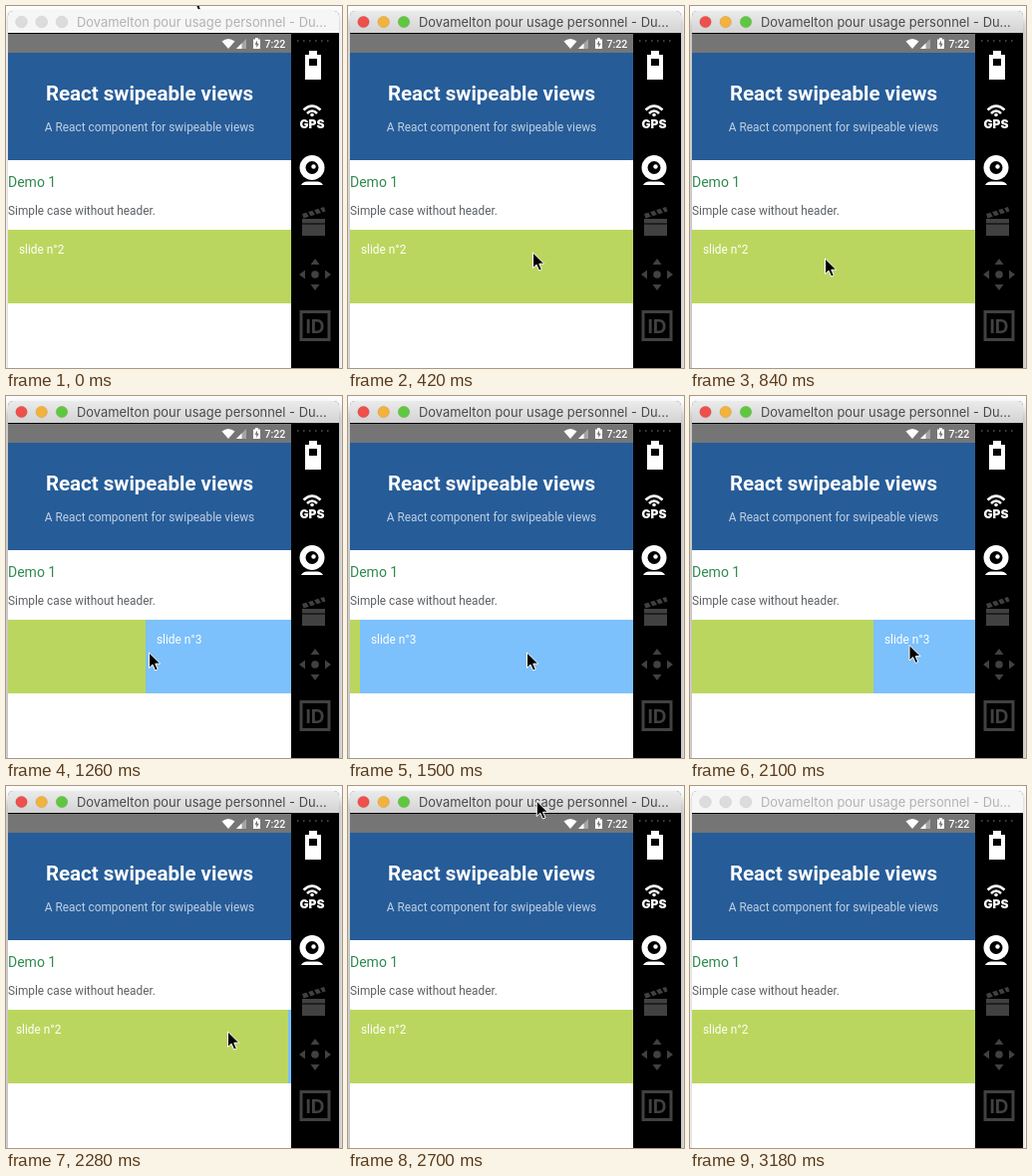
These frames come from a looping animation (337x364 px, 3240 ms). An HTML page:

```html
<!DOCTYPE html>
<html lang="fr">
<head>
<meta charset="utf-8">
<title>Swipeable views</title>
<style>
  html, body { margin: 0; width: 100%; height: 100%; overflow: hidden; background: #fdfdfd; }
  svg { display: block; }
  text { font-family: Roboto, sans-serif; font-size: 11.85px; fill: #fff; }
  #title, .label { font-family: Inter, sans-serif; text-anchor: middle; }
  #title { font-size: 12.9px; text-anchor: start; fill: #b2b2b2; }
  #bar { fill: #f6f6f6; }
  #lights circle { r: 5.8px; fill: #dcdcdc; stroke: #cecece; stroke-width: .6; }
  .active #bar { fill: url(#chrome); }
  .active #title { fill: #484848; }
  .active #lights circle { stroke: #0002; }
  .active #lights :nth-child(1) { fill: #ee504b; }
  .active #lights :nth-child(2) { fill: #f3b23b; }
  .active #lights :nth-child(3) { fill: #5fc73f; }
</style>
</head>
<body>
<svg id="stage" width="337" height="364">
  <defs>
    <linearGradient id="chrome" x2="0" y2="1">
      <stop stop-color="#ebebeb"/><stop offset="1" stop-color="#d3d3d3"/>
    </linearGradient>
  </defs>

  <rect id="frame" x="2" y="5" width="332" height="380" rx="5"/>
  <path id="bar" d="M2 27V10q0-5 5-5H329q5 0 5 5V27Z"/>
  <g id="lights">
    <circle cx="15.5" cy="16"/><circle cx="35.7" cy="16"/><circle cx="56" cy="16"/>
  </g>
  <text id="title" x="71" y="21">Dovamelton pour usage personnel - Du...</text>

  <!-- phone screen -->
  <rect x="2" y="28" width="284" height="336" fill="#fff"/>
  <rect x="2" y="28" width="284" height="19" fill="#757575"/>
  <g fill="#fff">
    <path d="M216.5 35.5Q223 30.500 229.500 35.500L223 43Z"/>
    <path d="M241 33V43H231Z" opacity=".35"/>
    <path d="M236.500 37.500V43H231Z"/>
    <path d="M248 33.500H250V32H253V33.500H255V43H248Z"/>
    <path d="M252 34.500L249.500 38.800H251.200V42L253.700 37.700H252Z" fill="#757575"/>
  </g>
  <text x="259.5" y="42" style="font-size:10.6px;font-weight:500">7:22</text>
  <rect x="2" y="47" width="284" height="108" fill="#265c98"/>
  <text x="144" y="95" text-anchor="middle" style="font-size:20.5px;font-weight:700">React swipeable views</text>
  <text x="144" y="125.5" text-anchor="middle" style="fill:#c0d0e2">A React component for swipeable views</text>
  <text x="2" y="182" style="font-size:14px;fill:#2f8a4e">Demo 1</text>
  <text x="2" y="210" style="fill:#5c6064">Simple case without header.</text>
  <svg x="2" y="225" width="284" height="74">
    <g id="slides">
      <rect width="284" height="74" fill="#bbd65e"/>
      <rect x="284" width="284" height="74" fill="#7cc0fc"/>
      <text x="11" y="24">slide n°2</text>
      <text x="295" y="24">slide n°3</text>
    </g>
  </svg>

  <!-- side tools -->
  <path d="M292 35H326" stroke="#555" stroke-width="1.5" stroke-dasharray="1.5 4.5"/>
  <g fill="#fff">
    <path d="M300 49H304V45H312V49H316V74H300Z"/>
    <rect x="304" y="53" width="8" height="7" fill="#000"/>
    <path d="M298.5 104.5Q307 96.500 315.500 104.500M302 108Q307 103 312 108" fill="none" stroke="#fff" stroke-width="2.5"/>
    <circle cx="307" cy="109.5" r="1.8"/>
    <text class="label" x="307" y="123" style="font-size:12px;font-weight:900">GPS</text>
    <circle cx="307" cy="162.5" r="12.5"/>
    <circle cx="307" cy="162.5" r="6.5" fill="#000"/>
    <circle cx="308.5" cy="161.5" r="2.2"/>
    <path d="M296 180Q298 176 303 176.500H311Q316 176 318 180Z"/>
  </g>
  <g fill="#414141">
    <rect x="297" y="214" width="23" height="17"/>
    <path d="M297 209L319 202L320.500 206.500L298.500 213.500Z"/>
    <path d="M302 207L305 212M308 205L311 210M314 203L317 208" stroke="#000" stroke-width="1.8"/>
    <path d="M297 219H320" stroke="#000"/>
    <circle cx="310" cy="270" r="3.8"/>
    <g id="pad"></g>
    <rect x="296" y="307.5" width="28" height="28" fill="none" stroke="#414141" stroke-width="3"/>
    <text class="label" x="310" y="328.5" style="font-size:19px;font-weight:700;fill:#414141">ID</text>
  </g>

  <path id="cursor" stroke="#fff" d="M0 0V15.500L3.600 12.200L6.100 18L8.800 16.900L6.300 11.200H11.300Z"/>
</svg>
<script>
const LOOP = 3240, STEP = 60, WIDTH = 284;
const el = id => document.getElementById(id);

el('pad').innerHTML = [0, 90, 180, 270].map(a =>
  `<path d="M310 254l4.500 6h-9Z" transform="rotate(${a} 310 270)"/>`).join('');

// Pointer path: [ms, x, y]
const path = [
  [0, 186, -14], [120, 185, 248], [600, 185, 248], [840, 135, 254],
  [1020, 112, 257], [1260, 143, 258], [1500, 179, 258], [1920, 217, 254],
  [2280, 222, 247], [2400, 194, 135], [2520, 194, 135], [2760, 187, -25], [LOOP, 187, -25]
];

function pointer(t) {
  const i = path.findIndex(k => k[0] > t);
  const [t0, x0, y0] = path[i - 1], [t1, x1, y1] = path[i];
  const p = (t - t0) / (t1 - t0);
  return [x0 + (x1 - x0) * p + .5, y0 + (y1 - y0) * p];
}

// Each swipe is a logistic curve around its middle time
const swipe = (t, middle, spread) => 1 / (1 + Math.exp((middle - t) / spread));
const offset = t => Math.floor(WIDTH * (swipe(t, 1255, 73) - swipe(t, 2074, 46)));

function draw(now) {
  const t = Math.floor(now % LOOP / STEP) * STEP;
  const active = t >= 360 && t < 3180;
  const focus = active ? Math.min(1, (t - 300) / 180) : 0;
  el('stage').classList.toggle('active', active);
  el('frame').style.filter =
    `drop-shadow(0 ${2 + 6 * focus}px ${2 + 4 * focus}px rgba(0, 0, 0, ${.25 + .2 * focus}))`;
  el('cursor').setAttribute('transform', `translate(${pointer(t)})`);
  el('slides').setAttribute('transform', `translate(${-Math.max(0, offset(t))})`);
}

const start = performance.now();
function tick() {
  draw(performance.now() - start);
  requestAnimationFrame(tick);
}
tick();
</script>
</body>
</html>
```
